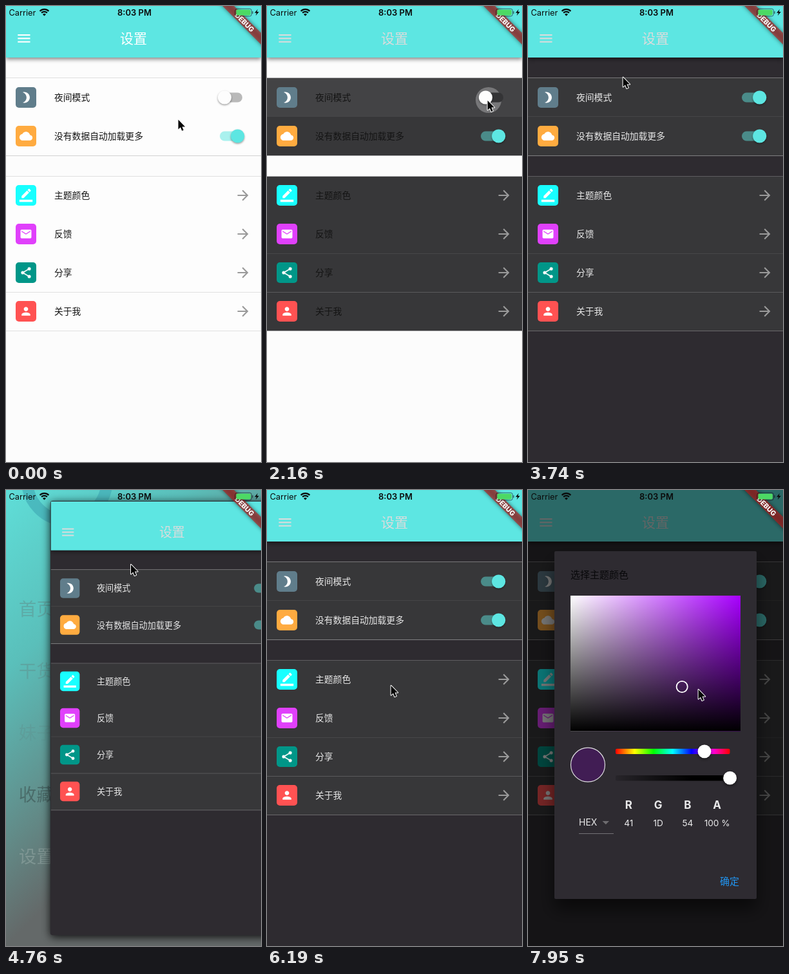
An HTML page with a canvas for the animation above (8 s loop, 396 by 708 pixels).

```html
<!DOCTYPE html>
<html lang="zh">
<head>
<meta charset="utf-8">
<title>设置</title>
<style>
html, body { margin: 0; width: 100%; height: 100%; overflow: hidden; background: #fcfcfc; }
canvas { display: block; width: 396px; height: 708px; }
</style>
</head>
<body>
<canvas id="stage"></canvas>
<script>
const W = 396, H = 708, LOOP = 8000;
const CJK = '"Noto Sans CJK SC", "Noto Sans CJK", sans-serif';
const LATIN = 'Inter, Roboto, sans-serif';
const TEAL = '#5de6e2';

const canvas = document.getElementById('stage');
const ratio = window.devicePixelRatio || 1;
canvas.width = W * ratio;
canvas.height = H * ratio;
const ctx = canvas.getContext('2d');

const glyphs = {
  moon: 'M9 2c-1.05 0-2.05.16-3 .46 4.06 1.27 7 5.06 7 9.54s-2.94 8.27-7 9.54c.95.3 1.95.46 3 .46 5.52 0 10-4.48 10-10S14.52 2 9 2z',
  cloud: 'M19.35 10.04C18.67 6.59 15.64 4 12 4 9.11 4 6.6 5.64 5.35 8.04 2.34 8.36 0 10.91 0 14c0 3.31 2.69 6 6 6h13c2.76 0 5-2.24 5-5 0-2.64-2.05-4.78-4.65-4.96z',
  pen: 'M17.75 7L14 3.25l-10 10V17h3.75l10-10zm2.96-2.96c.39-.39.39-1.02 0-1.41L18.37.29c-.39-.39-1.02-.39-1.41 0L15 2.25 18.75 6l1.96-1.96zM0 20h24v4H0z',
  mail: 'M20 4H4c-1.1 0-2 .9-2 2v12c0 1.1.9 2 2 2h16c1.1 0 2-.9 2-2V6c0-1.1-.9-2-2-2zm0 4l-8 5-8-5V6l8 5 8-5v2z',
  person: 'M12 12c2.21 0 4-1.79 4-4s-1.79-4-4-4-4 1.79-4 4 1.79 4 4 4zm0 2c-2.67 0-8 1.34-8 4v2h16v-2c0-2.66-5.33-4-8-4z',
  arrow: 'M12 4l-1.41 1.41L16.17 11H4v2h12.17l-5.58 5.59L12 20l8-8z'
};
for (const name in glyphs) glyphs[name] = new Path2D(glyphs[name]);
const pointer = new Path2D('M0 0V14.8L3.4 11.7 5.7 17.2 8.2 16.1 5.9 10.8H10.6Z');

const rows = [
  { y: 142, label: '夜间模式', icon: 'moon', color: '#607d8b' },
  { y: 202, label: '没有数据自动加载更多', icon: 'cloud', color: '#ffab40' },
  { y: 294, label: '主题颜色', icon: 'pen', color: '#18ffff' },
  { y: 354, label: '反馈', icon: 'mail', color: '#e040fb' },
  { y: 414, label: '分享', icon: 'share', color: '#009688' },
  { y: 474, label: '关于我', icon: 'person', color: '#ff5252' }
];
// y, opacity in the light theme, opacity in the dark theme
const dividers = [
  [111, .11, .34], [171, 0, .07], [232, .17, .38], [264, .11, .22],
  [384, 0, .08], [444, .11, .18], [504, .11, .27]
];

// time, x, y
const cursorKeys = [
  [0, 267, 176], [60, 264, 165], [190, 248, 100], [260, 241, 121], [500, 242, 122],
  [1300, 342, 146], [3380, 342, 146], [3740, 147, 110], [4510, 147, 110],
  [4760, 193, 115], [4910, 253, 117], [5300, 253, 117], [5550, 152, 121],
  [5690, 120, 140], [6080, 191, 289], [6190, 192, 303], [6850, 192, 303],
  [7100, 195, 284], [7340, 195, 284], [7950, 264, 309]
];
const drawerKeys = [[0, 0], [4500, 0], [4760, .248], [4910, .4], [5300, .4], [5550, .145], [5700, 0]];
const ringKeys = [[7360, 197, 292], [7950, 239.2, 305.5]];

const lerp = (a, b, k) => a + (b - a) * k;
const clamp = v => Math.max(0, Math.min(1, v));

function sample(keys, t) {
  let i = 0;
  while (i < keys.length - 2 && t >= keys[i + 1][0]) i++;
  const [a, b] = [keys[i], keys[i + 1]];
  const k = clamp((t - a[0]) / (b[0] - a[0]));
  return a.slice(1).map((v, n) => lerp(v, b[n + 1], k));
}

const rgb = c => `rgb(${c.map(Math.round).join(',')})`;
const mix = (a, b, k) => rgb(a.map((v, i) => lerp(v, b[i], k)));

function themeAt(t) {
  if (t < 2160) return { row: 0, bg: 0, text: 0, knob: 0 };
  if (t < 2460) return { row: 1, bg: 0, text: 0, knob: 0 };
  if (t < 2750) return { row: 1, bg: .88, text: .8, knob: .85 };
  return { row: 1, bg: 1, text: 1, knob: 1 };
}

function rect(x, y, w, h, fill) {
  ctx.fillStyle = fill;
  ctx.fillRect(x, y, w, h);
}

function round(x, y, w, h, r, fill) {
  ctx.beginPath();
  ctx.roundRect(x, y, w, h, r);
  ctx.fillStyle = fill;
  ctx.fill();
}

function disc(x, y, r, fill) {
  ctx.beginPath();
  ctx.arc(x, y, r, 0, 7);
  ctx.fillStyle = fill;
  ctx.fill();
}

function text(str, x, y, font, fill, align = 'left') {
  ctx.font = font;
  ctx.textAlign = align;
  ctx.fillStyle = fill;
  ctx.fillText(str, x, y);
}

function shadow(color, blur, dy) {
  ctx.shadowColor = color;
  ctx.shadowBlur = blur * ratio;
  ctx.shadowOffsetY = dy * ratio;
}

function scoped(draw) {
  ctx.save();
  draw();
  ctx.restore();
}

function glyph(name, cx, cy, size, fill) {
  scoped(() => {
    ctx.translate(cx, cy);
    ctx.scale(size / 24, size / 24);
    ctx.translate(-12, -12);
    if (name === 'share') {
      ctx.beginPath();
      ctx.moveTo(18, 5);
      ctx.lineTo(6, 12);
      ctx.lineTo(18, 19);
      ctx.strokeStyle = fill;
      ctx.lineWidth = 2;
      ctx.stroke();
      for (const [x, y] of [[18, 5], [6, 12], [18, 19]]) disc(x, y, 3, fill);
    } else {
      ctx.fillStyle = fill;
      ctx.fill(glyphs[name]);
    }
  });
}

function toggle(y, on, dark) {
  const off = dark ? '#343436' : '#b9b9b9';
  round(332, y - 7.4, 35, 14.8, 7.4, on ? (dark ? '#4a8b89' : '#a9f1ee') : off);
  scoped(() => {
    shadow('rgba(0,0,0,.4)', 3, 1.5);
    disc(lerp(339.5, 359.7, on), y, 10.6, on ? TEAL : '#fdfdfd');
  });
}

function drawPage(t) {
  const th = themeAt(t);
  const pressed = t >= 2160 && t < 2460;
  rect(0, 0, W, H, mix([252, 252, 252], [46, 43, 48], th.bg));
  const rowFill = mix([253, 253, 253], [55, 55, 57], th.row);
  rect(0, 111.5, W, 121, rowFill);
  rect(0, 264.5, W, 240, rowFill);
  if (pressed) rect(0, 112, W, 59, '#434345');
  for (const [y, light, dark] of dividers) {
    rect(0, y, W, 1, th.row ? `rgba(255,255,255,${dark})` : `rgba(0,0,0,${light})`);
  }

  scoped(() => {
    shadow('rgba(0,0,0,.45)', 6, 2.5);
    rect(0, 0, W, 80, TEAL);
  });
  const ink = th.row ? '#d9dcdc' : '#fff';
  for (let i = 0; i < 3; i++) rect(18.3, 44 + i * 5.3, 19.2, 2.1, ink);
  text('设置', 198, 58, '21px ' + CJK, ink, 'center');

  const label = mix([20, 20, 20], [232, 232, 232], th.text);
  rows.forEach((row, i) => {
    round(15, row.y - 16, 32, 32, 5, row.color);
    glyph(row.icon, 31, row.y, 20.3, '#fff');
    text(row.label, 75, row.y + 5.2, '13.8px ' + CJK, label);
    if (i > 1) glyph('arrow', 368, row.y, 25.3, '#9a9a9a');
  });
  if (pressed) disc(344, 146, 20, '#777779');
  toggle(142, th.knob, th.row);
  toggle(202, 1, th.row);
}

function drawMenu(p) {
  const g = ctx.createLinearGradient(0, 0, 354, 354);
  [[0, '#5fded8'], [.4, '#5abfba'], [.78, '#628a87'], [1, '#646969']].forEach(s => g.addColorStop(...s));
  rect(0, 0, W, H, g);
  scoped(() => {
    const zoom = 1.5 - .5 * p;
    ctx.translate(198, 354);
    ctx.scale(zoom, zoom);
    ctx.translate(-198, -354);
    ctx.globalAlpha = Math.min(1, p * 2.5);
    ctx.beginPath();
    ctx.arc(123, 86, 45, 0, 7);
    ctx.lineWidth = 13;
    ctx.strokeStyle = '#3fa9b4';
    ctx.stroke();
    ['首页', '干货', '妹子', '收藏', '设置'].forEach((s, i) => {
      const fill = i === 3 ? '#3d5553' : i === 4 ? '#8fa3a1' : '#5f9995';
      text(s, 68.5, 378 + (i - 2) * 69.8, '20px ' + CJK, fill);
    });
  });
}

function drawDrawer(t, p) {
  drawMenu(p);
  scoped(() => {
    const s = 1 - .2 * p;
    ctx.translate(280 * p, H / 2 * (1 - s));
    ctx.scale(s, s);
    scoped(() => {
      shadow('rgba(0,0,0,.85)', 14, 3);
      round(-1, -1, W + 2, H + 2, 4, '#2e2b30');
    });
    ctx.beginPath();
    ctx.roundRect(-1, 0, W + 1, H, 10 * p);
    ctx.clip();
    drawPage(t);
  });
}

function hsv(h, s, v) {
  const f = n => {
    const k = (n + h / 60) % 6;
    return 255 * v * (1 - s * clamp(Math.min(k, 4 - k)));
  };
  return [f(5), f(3), f(1)].map(Math.round);
}

function fade(x0, y0, x1, y1, colors) {
  const g = ctx.createLinearGradient(x0, y0, x1, y1);
  colors.forEach((c, i) => g.addColorStop(i / (colors.length - 1), c));
  return g;
}

function drawDialog(t) {
  scoped(() => {
    shadow('rgba(0,0,0,.55)', 26, 16);
    round(41, 95, 314, 540, 2, '#2e2b31');
  });
  text('选择主题颜色', 66, 137, '15px ' + CJK, '#08080a');

  const hue = 279.5;
  const [rx, ry] = t < 7360 ? [120.2, 314.7] : sample(ringKeys, t);
  const color = hsv(hue, (rx - 66) / 264, 1 - (ry - 164) / 210.5);
  rect(66, 164, 264, 210.5, fade(66, 0, 330, 0, ['#fff', rgb(hsv(hue, 1, 1))]));
  rect(66, 164, 264, 210.5, fade(0, 164, 0, 374.5, ['rgba(0,0,0,0)', '#000']));
  ctx.strokeStyle = '#fff';
  ctx.lineWidth = 1.8;
  ctx.beginPath();
  ctx.arc(rx, ry, 8.6, 0, 7);
  ctx.stroke();

  disc(93, 426.7, 26.5, rgb(color));
  ctx.strokeStyle = '#dedde0';
  ctx.lineWidth = 1.2;
  ctx.stroke();

  const spectrum = Array.from({ length: 7 }, (_, i) => rgb(hsv(i * 60, 1, 1)));
  round(136, 401.7, 177.5, 8.4, 2, fade(136, 0, 313, 0, spectrum));
  round(136, 443, 177.5, 8.4, 2, fade(136, 0, 313, 0, ['rgba(0,0,0,.15)', 'rgba(0,0,0,.6)', '#000', '#000']));
  scoped(() => {
    shadow('rgba(0,0,0,.6)', 5, 1.5);
    disc(274, 405.8, 10.4, '#fff');
    disc(313.6, 447.2, 10.4, '#fff');
  });

  const values = color.map(v => v.toString(16).toUpperCase().padStart(2, '0')).concat('100 %');
  values.forEach((v, i) => {
    const x = 156.3 + i * 45.8;
    text('RGBA'[i], x, 495, '700 17px ' + LATIN, '#e9e9ea', 'center');
    text(v, x, 522.3, '13.7px ' + LATIN, '#e9e9ea', 'center');
  });
  text('HEX', 79, 520.5, '14px ' + LATIN, '#e9e9ea');
  ctx.fillStyle = '#6e6c70';
  ctx.fill(new Path2D('M115.5 514h10.6l-5.3 5.3z'));
  rect(79, 533, 54, 1, '#747276');
  text('确定', 298, 612.5, '15px ' + CJK, '#2196f3');
}

function drawBanner() {
  scoped(() => {
    ctx.beginPath();
    ctx.rect(0, 0, W, H);
    ctx.clip();
    ctx.translate(W, 0);
    ctx.rotate(Math.PI / 4);
    scoped(() => {
      // the caster stays off stage, only its shadow lands on the corner
      shadow('rgba(0,0,0,.5)', 6, 0);
      ctx.shadowOffsetX = 1000 * ratio;
      const d = 1000 * Math.SQRT1_2;
      rect(-60 - d, 29.6 + d, 120, 12.7, '#000');
    });
    rect(-60, 29.6, 120, 12.7, 'rgba(183,28,28,.627)');
    text('DEBUG', 0, 39.8, '800 10.6px ' + LATIN, '#fff', 'center');
  });
}

function drawStatus() {
  text('Carrier', 4.5, 14.6, '12.8px ' + LATIN, '#0b0b0b');
  text('8:03 PM', 199.5, 14.6, '600 13px ' + LATIN, '#0b0b0b', 'center');
  ctx.strokeStyle = '#0b0b0b';
  ctx.lineWidth = 2.2;
  for (const r of [9.8, 6.2]) {
    ctx.beginPath();
    ctx.arc(59.5, 15, r, -Math.PI * .75, -Math.PI * .25);
    ctx.stroke();
  }
  ctx.beginPath();
  ctx.moveTo(59.5, 15.4);
  ctx.arc(59.5, 15.4, 3.5, -Math.PI * .75, -Math.PI * .25);
  ctx.fillStyle = '#0b0b0b';
  ctx.fill();

  ctx.lineWidth = 1;
  ctx.strokeStyle = 'rgba(20,20,20,.6)';
  ctx.beginPath();
  ctx.roundRect(355.8, 4.3, 25.6, 11.6, 3);
  ctx.stroke();
  round(357.4, 5.8, 22.4, 8.6, 1.8, '#4cd964');
  round(382.3, 8, 1.4, 4.2, .7, 'rgba(20,20,20,.6)');
  ctx.fillStyle = '#0b0b0b';
  ctx.fill(new Path2D('M390.8 5L386 10.8h3.1L387.8 15l5-6h-3.1z'));
}

function drawCursor(t) {
  const [x, y] = sample(cursorKeys, t);
  scoped(() => {
    ctx.translate(x + .6, y + .8);
    ctx.lineJoin = 'round';
    ctx.strokeStyle = '#fff';
    ctx.lineWidth = 2;
    ctx.stroke(pointer);
    ctx.fillStyle = '#050505';
    ctx.fill(pointer);
  });
}

function render(t) {
  ctx.setTransform(ratio, 0, 0, ratio, 0, 0);
  const [p] = sample(drawerKeys, t);
  if (p > 0) drawDrawer(t, p);
  else drawPage(t);

  const open = clamp((t - 6490) / 180);
  if (open > 0) {
    rect(0, 0, W, H, `rgba(0,0,0,${.54 * open})`);
    scoped(() => {
      ctx.globalAlpha = open;
      drawDialog(t);
    });
  }
  drawBanner();
  drawStatus();
  drawCursor(t);
}

const start = performance.now();
function tick() {
  render((performance.now() - start) % LOOP);
  requestAnimationFrame(tick);
}
tick();
</script>
</body>
</html>
```
